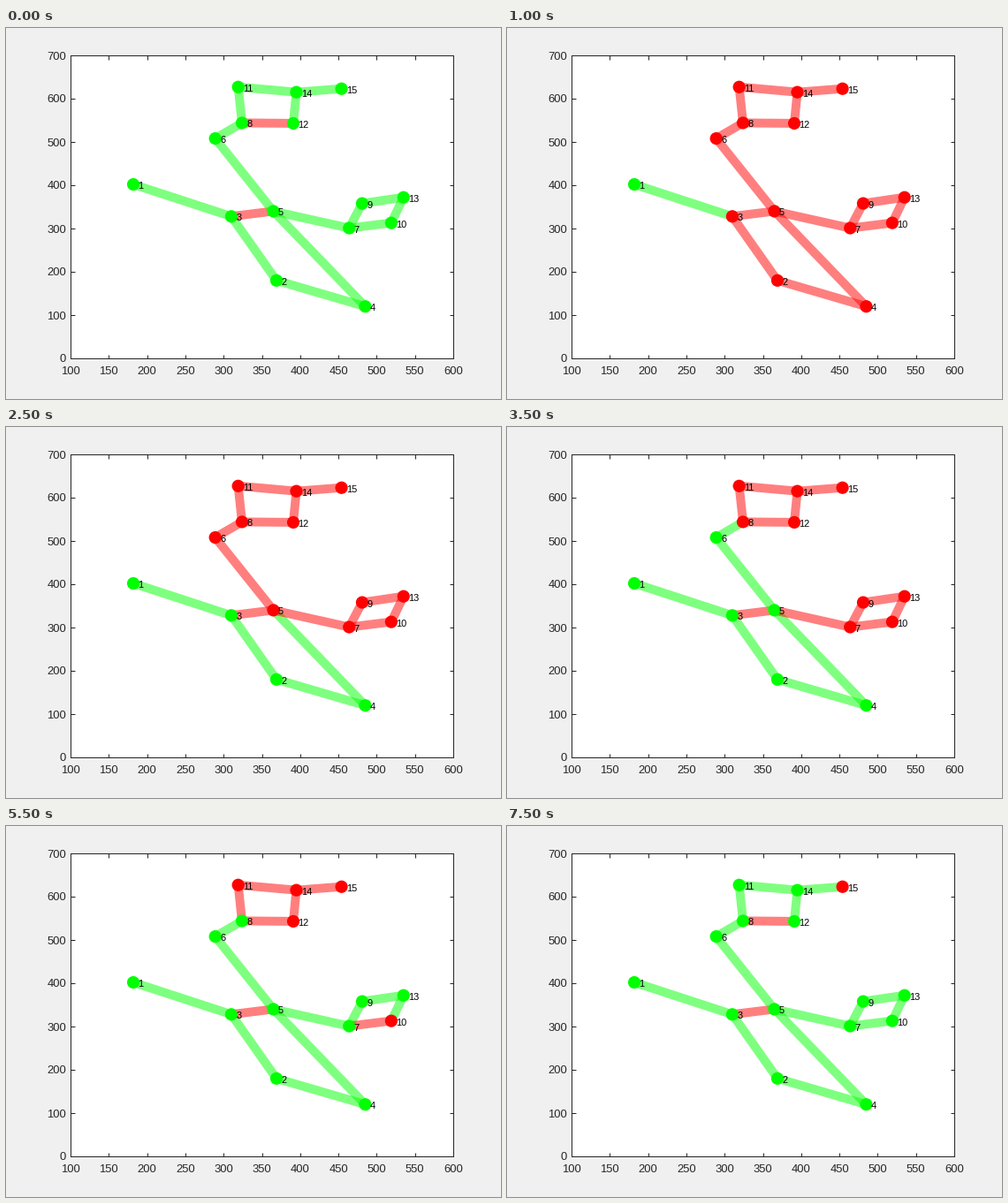
A matplotlib script for the animation above (8 s loop, 560x420 px).

```python
from itertools import pairwise

import matplotlib.pyplot as plt
from matplotlib.animation import FuncAnimation
from matplotlib.collections import LineCollection

W, H, DPI = 560, 420, 100
PX = 72 / DPI  # points per pixel
INK = "#262626"
RED, GREEN = (1, 0, 0), (0, 1, 0)

# Places of nodes 1, 2, 3 ... in data units
PLACES = [(182, 402), (369, 180), (310, 328), (485, 120), (365, 340),
          (289, 508), (464, 301), (324, 544), (481, 358), (519, 313),
          (319, 627), (391, 543), (535, 372), (395, 615), (454, 623)]
CHAINS = [(1, 3, 2, 4, 5, 6, 8, 11, 14, 15), (3, 5, 7, 9, 13, 10, 7), (8, 12, 14)]
VISITS = (1, 3, 2, 4, 5, 6, 8, 7, 9, 13, 10, 11, 14, 12, 15)

NODES = dict(enumerate(PLACES, start=1))
EDGES = sorted(tuple(sorted(pair)) for chain in CHAINS for pair in pairwise(chain))


def route(start, goal):
    """Edges on the path with the fewest hops."""
    paths = [[start]]
    for path in paths:
        if path[-1] == goal:
            return {tuple(sorted(pair)) for pair in pairwise(path)}
        for edge in EDGES:
            if path[-1] in edge:
                neighbour = sum(edge) - path[-1]
                if neighbour not in path:
                    paths.append(path + [neighbour])


ROUTES = [route(*leg) for leg in pairwise(VISITS)]
FRAMES = len(ROUTES) + 2

plt.rcParams["font.family"] = "Liberation Sans"
fig = plt.figure(figsize=(W / DPI, H / DPI), dpi=DPI, facecolor="#f0f0f0")
ax = fig.add_axes([73 / W, 46 / H, 433 / W, 343 / H])
ax.set(xlim=(100, 600), ylim=(0, 700),
       xticks=range(100, 601, 50), yticks=range(0, 701, 100))
ax.tick_params(direction="in", top=True, right=True, length=4.5 * PX, width=PX,
               color=INK, labelcolor=INK, labelsize=13 * PX)
ax.tick_params(axis="x", pad=9.5 * PX)
ax.tick_params(axis="y", pad=5 * PX)
for spine in ax.spines.values():
    spine.set(linewidth=PX, edgecolor=INK)

lines = ax.add_collection(LineCollection(
    [[NODES[a], NODES[b]] for a, b in EDGES],
    linewidths=10 * PX, capstyle="butt", zorder=3), autolim=False)
dots = ax.scatter(*zip(*PLACES), s=(14.2 * PX) ** 2, linewidths=0, zorder=4)
for name, place in NODES.items():
    ax.annotate(str(name), place, xytext=(5.6 * PX, -5 * PX),
                textcoords="offset points", fontsize=11 * PX,
                va="baseline", zorder=5)


def update(frame):
    # The loop opens on the finished search, then starts over
    step = (frame - 1) % FRAMES
    visited = VISITS[:step]
    walked = set().union(*ROUTES[:step])
    dots.set_facecolor([GREEN if name in visited else RED for name in NODES])
    lines.set_color([(*(GREEN if edge in walked else RED), 0.5) for edge in EDGES])
    return lines, dots


anim = FuncAnimation(fig, update, frames=FRAMES, interval=500, repeat=True,
                     repeat_delay=0, blit=False)
plt.show()
```
